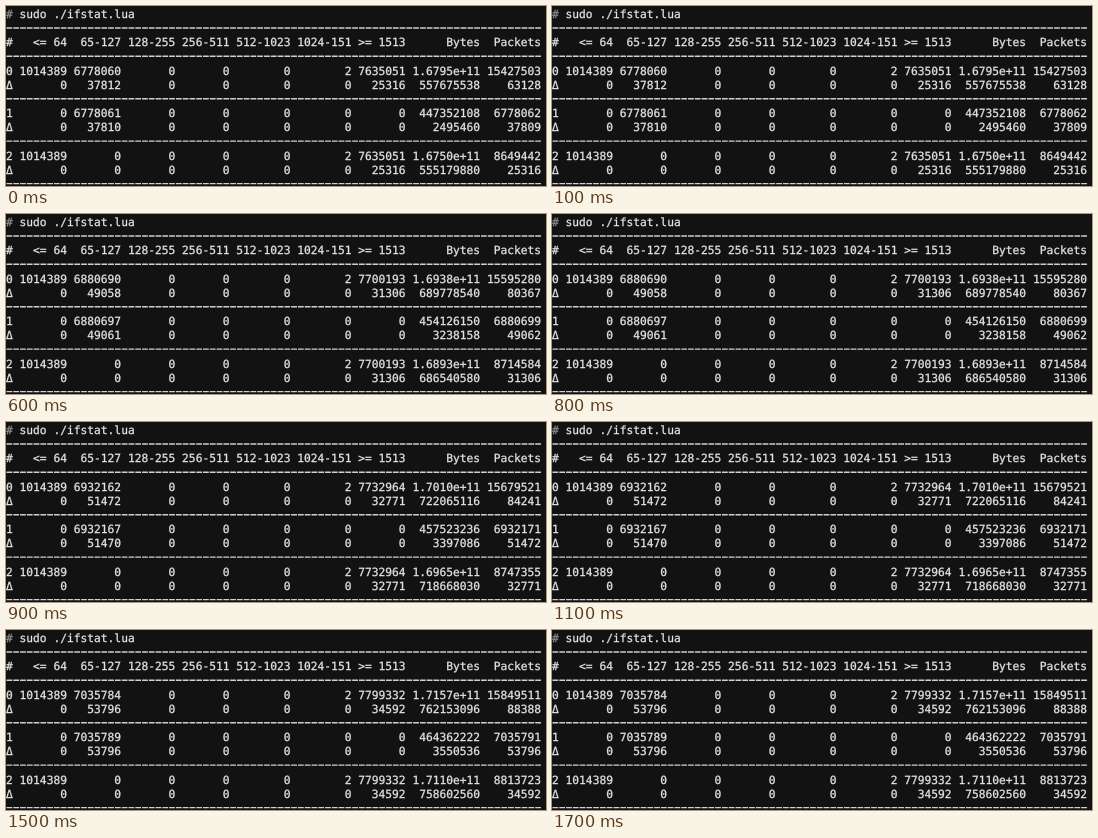
Recreate the animation shown at these times as an HTML page with a canvas. Size 540 px wide and 180 px high, loop 1.8 s.

```html
<!DOCTYPE html>
<html lang="en">
<head>
<meta charset="utf-8">
<style>
  html, body { margin: 0; width: 100%; height: 100%; overflow: hidden; background: #121212; }
  canvas { display: block; }
</style>
</head>
<body>
<canvas id="screen" width="540" height="180"></canvas>
<script>
const ctx = document.getElementById('screen').getContext('2d');
const PITCH = 6.778, LINE = 14.14, BASE = 12.2, STEP = 300;
const WIDTHS = [1, 8, 8, 8, 8, 9, 9, 8, 11, 9];
const HEADER = ['#', '<= 64', '65-127', '128-255', '256-511', '512-1023', '1024-151', '>= 1513', 'Bytes', 'Packets'];

// Per sample: small, big, then bytes and packets of queue 0, 1 and 2; each as [total, delta].
const SAMPLES = [
  { small: [6778060, 37812], small1: [6778061, 37810], big: [7635051, 25316],
    bytes: ['1.6795e+11', 557675538], packets: [15427503, 63128],
    bytes1: [447352108, 2495460], packets1: [6778062, 37809], bytes2: ['1.6750e+11', 555179880] },
  { small: [6831632, 53572], small1: [6831636, 53575], big: [7668887, 33836],
    bytes: ['1.6869e+11', 745559364], packets: [15514913, 87410],
    bytes1: [450887992, 3535884], packets1: [6831637, 53575], bytes2: ['1.6824e+11', 742023480] },
  { small: [6880690, 49058], small1: [6880697, 49061], big: [7700193, 31306],
    bytes: ['1.6938e+11', 689778540], packets: [15595280, 80367],
    bytes1: [454126150, 3238158], packets1: [6880699, 49062], bytes2: ['1.6893e+11', 686540580] },
  { small: [6932162, 51472], small1: [6932167, 51470], big: [7732964, 32771],
    bytes: ['1.7010e+11', 722065116], packets: [15679521, 84241],
    bytes1: [457523236, 3397086], packets1: [6932171, 51472], bytes2: ['1.6965e+11', 718668030] },
  { small: [6981988, 49826], small1: [6981993, 49826], big: [7764740, 31776],
    bytes: ['1.7080e+11', 700136130], packets: [15761123, 81602],
    bytes1: [460811686, 3288450], packets1: [6981995, 49824], bytes2: ['1.7034e+11', 696847680] },
  { small: [7035784, 53796], small1: [7035789, 53796], big: [7799332, 34592],
    bytes: ['1.7157e+11', 762153096], packets: [15849511, 88388],
    bytes1: [464362222, 3550536], packets1: [7035791, 53796], bytes2: ['1.7110e+11', 758602560] },
];

const format = cells => cells.map((cell, i) => String(cell).padStart(WIDTHS[i])).join('');

// A thin outline gives the glyphs a medium weight.
function text(row, string, color = '#e2e2e2') {
  const y = Math.round(BASE + row * LINE);
  ctx.fillStyle = ctx.strokeStyle = color;
  ctx.lineWidth = 0.3;
  ctx.setLineDash([]);
  ctx.fillText(string, 0, y);
  ctx.strokeText(string, 0, y);
}

function rule(row) {
  const y = BASE + row * LINE - 4.3;
  ctx.strokeStyle = '#d0d0d0';
  ctx.lineWidth = 1.4;
  ctx.setLineDash([PITCH - 1, 1]);
  ctx.beginPath();
  ctx.moveTo(0.5, y);
  ctx.lineTo(79 * PITCH, y);
  ctx.stroke();
}

function queue(row, id, tiny, small, two, big, bytes, packets) {
  [id, 'Δ'].forEach((label, k) => text(row + k, format([
    label, k ? 0 : tiny, small[k], 0, 0, 0, k ? 0 : two, big[k], bytes[k], packets[k],
  ])));
}

function draw(time) {
  const s = SAMPLES[Math.floor(time / STEP) % SAMPLES.length];
  const none = [0, 0];
  ctx.fillStyle = '#121212';
  ctx.fillRect(0, 0, 540, 180);
  ctx.font = '11.26px "DejaVu Sans Mono", monospace';
  ctx.textRendering = 'geometricPrecision';

  text(0, '#', '#8c8c8c');
  text(0, '  sudo ./ifstat.lua');
  text(2, format(HEADER));
  [1, 3, 6, 9, 12].forEach(rule);
  queue(4, 0, 1014389, s.small, 2, s.big, s.bytes, s.packets);
  queue(7, 1, 0, s.small1, 0, none, s.bytes1, s.packets1);
  queue(10, 2, 1014389, none, 2, s.big, s.bytes2, [s.big[0] + 1014391, s.big[1]]);
}

const start = performance.now();
function tick() {
  draw(performance.now() - start);
  requestAnimationFrame(tick);
}
tick();
</script>
</body>
</html>
```
